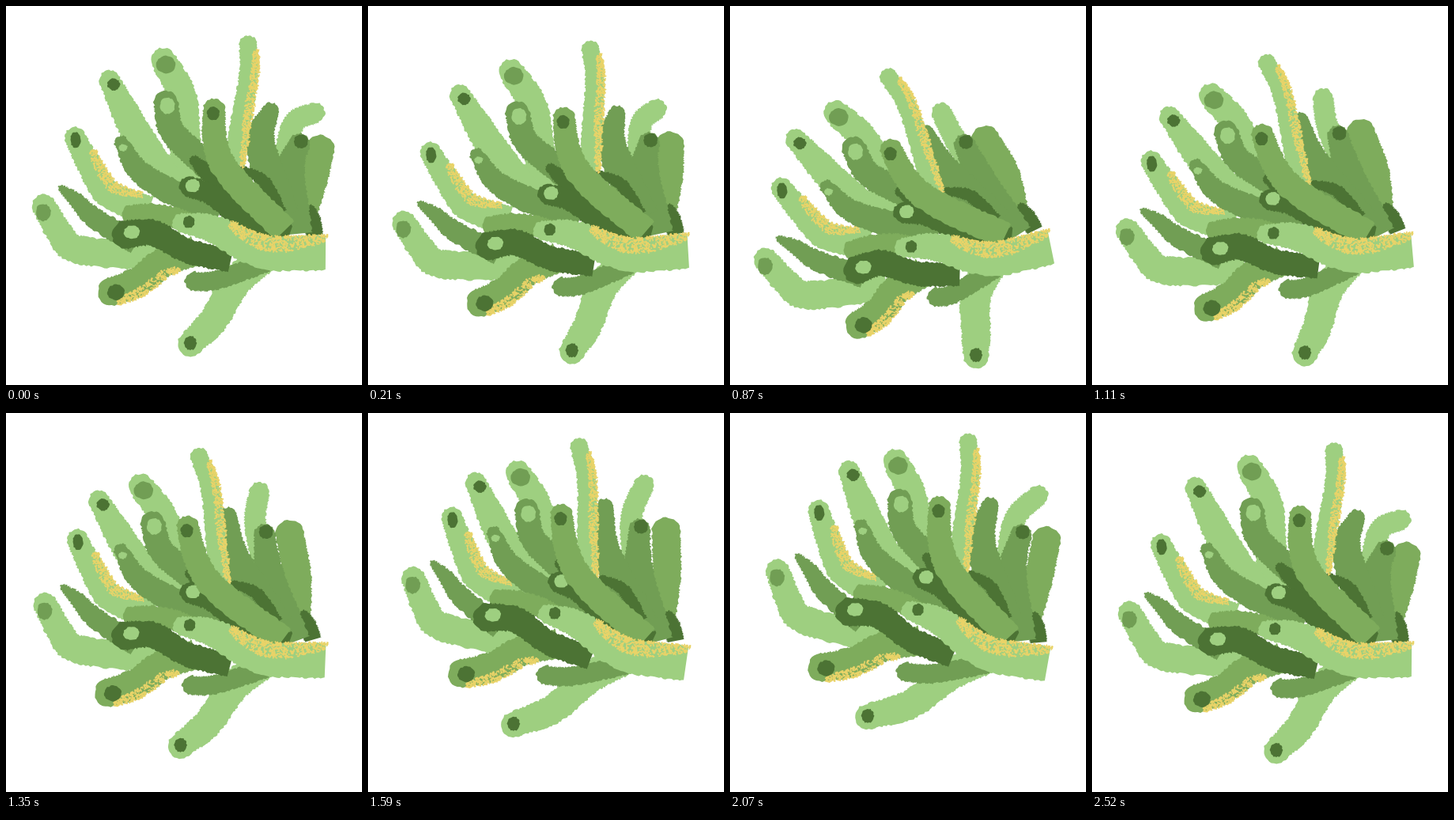
Recreate the animation shown at these times as an HTML page with a canvas. Size 450 px wide and 479 px high, loop 2550 ms.

```html
<!DOCTYPE html>
<html lang="en">
<head>
<meta charset="utf-8">
<title>Swaying coral</title>
<style>
html, body { margin: 0; width: 100%; height: 100%; overflow: hidden; background: #fff; }
canvas { display: block; }
</style>
</head>
<body>
<canvas id="stage" width="450" height="479"></canvas>
<script>
const ctx = document.getElementById('stage').getContext('2d');
const LIGHT = '#9ecf80', MID = '#7eac5c', DEEP = '#719e54', DARK = '#4c7334', GOLD = '#e9d368';
const LOOP = 2550, STEP = 30, CYCLE = 2520;
const ROOT = { x: 370, y: 300 }, SWAY = 0.19;
const N = 90, CAP = 16;

// Two swings drive everything: low limbs follow the early one, upright limbs the late one.
const KEYS = [0, 450, 870, 1110, 1590, 2070];
const EARLY = [0.1, -0.58, -1, -0.4, 0.82, 0.98];
const LATE = [1, -0.12, -1, -0.55, 0.33, 0.92];

const limbs = [];

function random(seed) {
  return () => {
    seed = (seed + 0x6d2b79f5) | 0;
    let t = Math.imul(seed ^ (seed >>> 15), 1 | seed);
    t = (t + Math.imul(t ^ (t >>> 7), 61 | t)) ^ t;
    return ((t ^ (t >>> 14)) >>> 0) / 4294967296;
  };
}

function hermite(a, ma, b, mb, s) {
  const q = s * s, c = q * s;
  return (2 * c - 3 * q + 1) * a + (c - 2 * q + s) * ma + (3 * q - 2 * c) * b + (c - q) * mb;
}

// Smooth periodic curve through unevenly spaced keys.
function swing(values, t) {
  const n = KEYS.length;
  const key = i => KEYS[(i + n) % n] + CYCLE * Math.floor(i / n);
  const val = i => values[(i + n) % n];
  const slope = j => {
    const h0 = key(j) - key(j - 1), h1 = key(j + 1) - key(j);
    return (h1 * (val(j) - val(j - 1)) / h0 + h0 * (val(j + 1) - val(j)) / h1) / (h0 + h1);
  };
  let i = n - 1;
  while (KEYS[i] > t) i--;
  const span = key(i + 1) - key(i);
  return hermite(val(i), slope(i) * span, val(i + 1), slope(i + 1) * span, (t - key(i)) / span);
}

function goldFlecks([side, from, to, width, count], rnd) {
  return Array.from({ length: count }, () => {
    const s = rnd();
    return {
      side,
      u: from + (to - from) * s,
      inset: Math.pow(rnd(), 1.2) * width * Math.sqrt(Math.sin(Math.PI * (0.06 + 0.88 * s))) - 1,
      slip: (rnd() - 0.5) * 4,
      angle: rnd() * Math.PI,
      size: 0.8 + rnd() * 1.4
    };
  });
}

// Spine points run from tip to base; bend and stretch add to the shared sway towards the tip.
function limb(color, tipR, baseR, spine, { dot, gold, bend = 0, stretch = 0 } = {}) {
  const rnd = random(limbs.length * 97 + 5);
  const [x, y] = spine[0];
  const rise = (ROOT.y - y) / Math.hypot(x - ROOT.x, y - ROOT.y);
  const lag = Math.min(1, Math.max(0, (rise - 0.4) / 0.6));
  const rough = Array.from({ length: 2 * N + CAP + 4 }, () => (rnd() - 0.5) * 2.4);
  const flecks = gold ? goldFlecks(gold, rnd) : [];
  limbs.push({ color, tipR, baseR, spine, lag, bend, stretch, dot, rough, flecks });
}

limb(LIGHT, 13, 14, [[390,135], [363,150], [348,212]], { bend: 0.15, stretch: 0.19 });
limb(LIGHT, 16, 20, [[199,69], [222,112], [226,160], [228,225]], { dot: [3, 5, 12, 11, DEEP] });
limb(LIGHT, 13, 21, [[131,94], [151,135], [173,175], [205,225]], { dot: [5, 5, 8, 7.5, DARK] });
limb(LIGHT, 13, 18, [[87,166], [106,202], [130,238], [180,258]],
  { dot: [1, 3, 6.5, 10, DARK], gold: [-1, 0.2, 0.92, 15, 300] });
limb(LIGHT, 15, 18, [[48,253], [68,287], [92,308], [190,317]], { dot: [-1, 8, 9.5, 11, DEEP] });
limb(MID, 18, 18, [[397,181], [389,218], [372,272]], { bend: 0.1, stretch: 0.17 });
limb(DARK, 6, 11, [[385,257], [388,270], [390,290]]);
limb(DEEP, 13, 19, [[371,174], [360,208], [368,288]],
  { bend: 0.08, stretch: 0.17, dot: [2, -3, 9, 9, DARK] });
limb(DEEP, 11, 21, [[334,133], [322,175], [350,265]], { bend: 0.07, stretch: 0.1 });
limb(DARK, 5, 9, [[300,207], [327,223], [346,262]]);
limb(LIGHT, 11, 13, [[306,48], [307,85], [298,140], [288,200]],
  { bend: 0.03, stretch: 0.05, gold: [-1, 0.08, 1, 12, 400] });
limb(DEEP, 15, 17, [[202,122], [208,155], [232,182], [285,230]], { dot: [2, 4, 9.5, 10.5, LIGHT] });
limb(DEEP, 9, 17, [[146,173], [165,205], [200,230], [270,262]], { dot: [2, 6, 5.5, 4.5, LIGHT] });
limb(DARK, 6, 12, [[238,195], [255,212], [305,260]]);
limb(DARK, 13, 13, [[232,228], [262,240], [300,270], [358,290]], { dot: [4, -1, 9, 8.5, LIGHT] });
limb(MID, 14, 17, [[263,131], [264,170], [282,212], [352,284]],
  { bend: 0.03, stretch: 0.05, dot: [-1, 5, 8, 8.5, DARK] });
limb(MID, 11, 13, [[157,263], [185,262], [215,268], [260,285]]);
limb(DEEP, 4, 14, [[70,230], [88,245], [112,268], [165,300]]);
limb(LIGHT, 16, 20, [[233,427], [263,396], [290,350], [325,318]],
  { bend: 0.2, stretch: 0.16, dot: [0, -1, 8, 9, DARK] });
limb(DEEP, 12, 12, [[238,348], [268,346], [335,322]], { stretch: 0.08 });
limb(MID, 18, 19, [[134,361], [167,348], [202,322], [240,310]],
  { stretch: 0.05, dot: [5, 1, 11, 10, DARK], gold: [1, 0.02, 0.76, 13, 300] });
limb(DARK, 18, 15, [[152,289], [187,287], [228,309], [284,322]],
  { stretch: 0.03, dot: [7, -3, 10, 8.5, LIGHT] });
limb(LIGHT, 12, 22, [[222,274], [262,282], [325,311], [404,312]],
  { dot: [9, -1, 7.5, 7.5, DARK], gold: [-1, 0.42, 1, 20, 520] });

function along(v, u) {
  const last = v.length - 1, i = Math.min(last - 1, Math.floor(u * last));
  const slope = j => {
    const a = Math.max(0, j - 1), b = Math.min(last, j + 1);
    return (v[b] - v[a]) / (b - a);
  };
  return hermite(v[i], slope(i), v[i + 1], slope(i + 1), u * last - i);
}

// Turn the spine about the root, then sample it with radius and direction.
function posed({ spine, lag, bend, stretch, tipR, baseR }, now, rest) {
  const turn = s => s.early + (s.late - s.early) * lag;
  const reach = s => s.early - s.late * lag;
  const dTurn = turn(now) - turn(rest), dReach = reach(now) - reach(rest);
  const moved = spine.map(([x, y], i) => {
    const free = 1 - i / (spine.length - 1);
    const a = (SWAY + bend * free) * dTurn, k = 1 + stretch * free * dReach;
    const rx = (x - ROOT.x) * k, ry = (y - ROOT.y) * k, c = Math.cos(a), s = Math.sin(a);
    return { x: ROOT.x + rx * c - ry * s, y: ROOT.y + rx * s + ry * c };
  });
  const xs = moved.map(p => p.x), ys = moved.map(p => p.y);
  const pts = Array.from({ length: N + 1 }, (_, i) => {
    const u = i / N;
    return { x: along(xs, u), y: along(ys, u), r: baseR + (tipR - baseR) * (1 - u) ** 2 };
  });
  pts.forEach((p, i) => {
    const a = pts[Math.max(0, i - 1)], b = pts[Math.min(N, i + 1)];
    const len = Math.hypot(b.x - a.x, b.y - a.y) || 1;
    p.dx = (b.x - a.x) / len;
    p.dy = (b.y - a.y) / len;
  });
  return pts;
}

function drawBody(pts, { color, rough }) {
  let k = 0;
  const edge = (p, a) => {
    const r = p.r + rough[k++], c = Math.cos(a) * r, s = Math.sin(a) * r;
    ctx.lineTo(p.x - p.dy * c - p.dx * s, p.y + p.dx * c - p.dy * s);
  };
  ctx.fillStyle = color;
  ctx.beginPath();
  for (let i = N; i >= 0; i--) edge(pts[i], 0);
  for (let i = 1; i < CAP; i++) edge(pts[0], Math.PI * i / CAP);
  for (let i = 0; i <= N; i++) edge(pts[i], Math.PI);
  ctx.fill();
}

function drawDot(tip, [dx, dy, rx, ry, color], rough) {
  ctx.fillStyle = color;
  ctx.beginPath();
  for (let i = 0; i < 28; i++) {
    const a = i / 28 * 2 * Math.PI, w = rough[i] * 0.6;
    ctx.lineTo(tip.x + dx + Math.cos(a) * (rx + w), tip.y + dy + Math.sin(a) * (ry + w));
  }
  ctx.fill();
}

function drawGold(pts, flecks) {
  ctx.strokeStyle = GOLD;
  ctx.lineWidth = 1.6;
  ctx.beginPath();
  for (const { side, u, inset, slip, angle, size } of flecks) {
    const p = pts[Math.round(u * N)], d = side * (p.r - inset);
    const x = p.x - p.dy * d + p.dx * slip, y = p.y + p.dx * d + p.dy * slip;
    const cx = Math.cos(angle) * size, cy = Math.sin(angle) * size;
    ctx.moveTo(x - cx, y - cy);
    ctx.lineTo(x + cx, y + cy);
  }
  ctx.stroke();
}

const swings = t => ({ early: swing(EARLY, t), late: swing(LATE, t) });
const rest = swings(0);

function draw(ms) {
  const now = swings(Math.floor((ms % LOOP) / STEP) * STEP % CYCLE);
  ctx.fillStyle = '#fff';
  ctx.fillRect(0, 0, 450, 479);
  for (const l of limbs) {
    const pts = posed(l, now, rest);
    drawBody(pts, l);
    drawGold(pts, l.flecks);
    if (l.dot) drawDot(pts[0], l.dot, l.rough);
  }
}

const start = performance.now();
function tick() {
  draw(performance.now() - start);
  requestAnimationFrame(tick);
}
tick();
</script>
</body>
</html>
```
